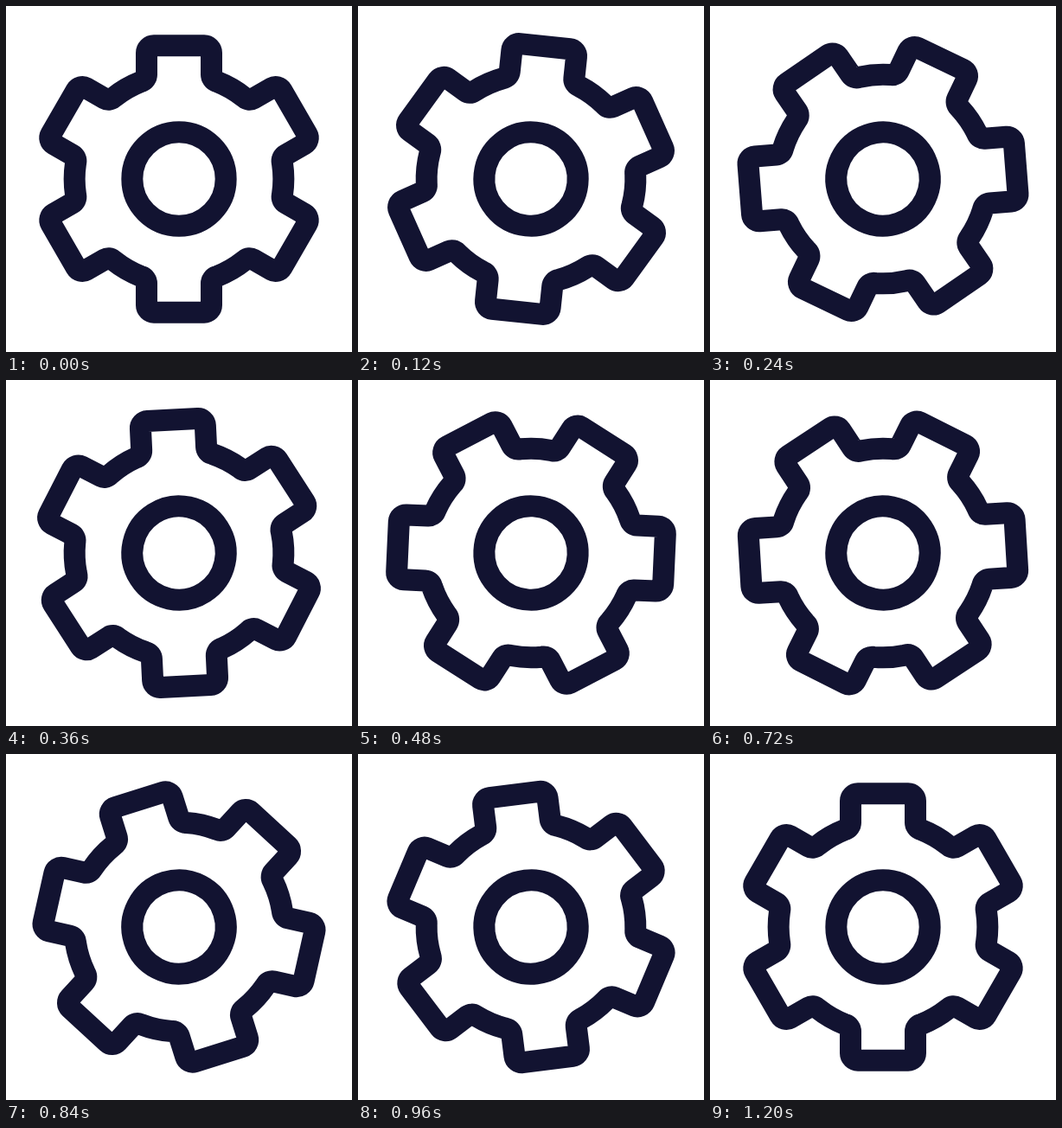
An HTML page with a canvas for the animation above (3.23 s loop, 400x400 px).

```html
<!DOCTYPE html>
<html lang="en">
<head>
<meta charset="utf-8">
<title>Turning gear</title>
<style>
  html, body { margin: 0; width: 100%; height: 100%; overflow: hidden; background: #fff; }
  canvas { display: block; width: 400px; height: 400px; }
</style>
</head>
<body>
<canvas id="stage" width="400" height="400"></canvas>
<script>
const ctx = document.getElementById('stage').getContext('2d');

const LOOP = 3230, STEP = 30, TURN_TIME = 1200;
const TEETH = 6, TURN = Math.PI;
const RING = 120.83, TIP = 154.17, HALF = 37.5, ROUND = 8.33, HUB = 54.17;
const BASE = Math.sqrt(RING * RING - HALF * HALF);
const PITCH = 2 * Math.PI / TEETH;

// Cubic Bezier easing with handles (x1, 0) and (x2, 1)
function ease(x, x1 = 0.333, x2 = 0.38) {
  if (x <= 0 || x >= 1) return x <= 0 ? 0 : 1;
  let lo = 0, hi = 1;
  for (let i = 0; i < 30; i++) {
    const t = (lo + hi) / 2, s = 1 - t;
    if (3 * s * s * t * x1 + 3 * s * t * t * x2 + t * t * t < x) lo = t;
    else hi = t;
  }
  return lo * lo * (3 - 2 * lo);
}

// Each pass adds a ring arc and the tooth after it, then turns by one pitch
function gearPath() {
  const edge = Math.asin(HALF / RING) + 0.06;
  const up = -Math.PI / 2;
  ctx.beginPath();
  for (let i = 0; i < TEETH; i++) {
    ctx.arc(0, 0, RING, up - PITCH + edge, up - edge);
    ctx.arcTo(-HALF, -BASE, -HALF, -TIP, ROUND);
    ctx.arcTo(-HALF, -TIP, HALF, -TIP, ROUND);
    ctx.arcTo(HALF, -TIP, HALF, -BASE, ROUND);
    ctx.arcTo(HALF, -BASE, RING * Math.sin(edge), -RING * Math.cos(edge), ROUND);
    ctx.rotate(PITCH);
  }
  ctx.closePath();
}

function draw(angle) {
  ctx.setTransform(1, 0, 0, 1, 0, 0);
  ctx.fillStyle = '#fff';
  ctx.fillRect(0, 0, 400, 400);
  ctx.translate(200, 200);
  ctx.rotate(angle);
  ctx.strokeStyle = '#121331';
  ctx.lineWidth = 25;
  ctx.lineJoin = 'round';
  gearPath();
  ctx.stroke();
  ctx.beginPath();
  ctx.arc(0, 0, HUB, 0, 2 * Math.PI);
  ctx.stroke();
}

const start = performance.now();

function tick() {
  const time = (performance.now() - start) % LOOP;
  const stepped = Math.floor(time / STEP) * STEP;
  draw(TURN * ease(stepped / TURN_TIME));
  requestAnimationFrame(tick);
}
tick();
</script>
</body>
</html>
```
